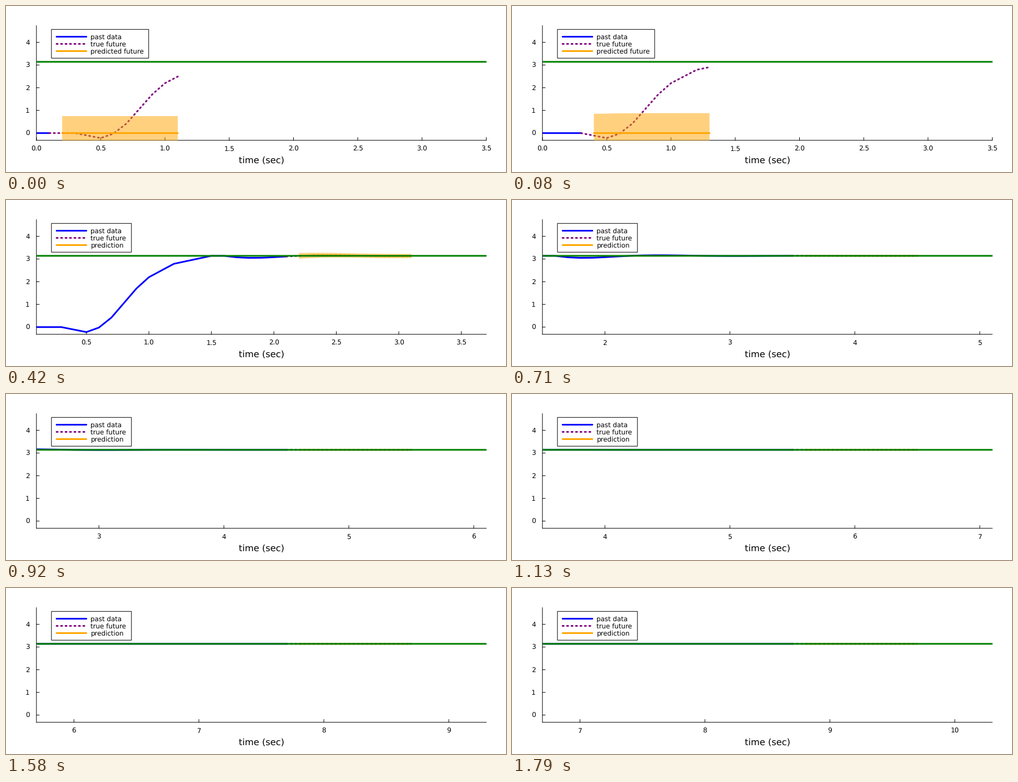
These frames come from a looping animation (900 by 300 pixels, 1.83 s). A matplotlib script:

```python
import numpy as np
import matplotlib.pyplot as plt
from matplotlib.animation import FuncAnimation
from matplotlib.patches import Rectangle

W, H, DPI = 900, 300, 100
PT = 72 / DPI                      # points per pixel
FRAMES, LOOP = 44, 1830
LEFT, RIGHT, TOP, BOTTOM = 54.8, 864.5, 35.5, 242.7
Y0, UNIT = 229.7, 41.0             # pixel row of zero, pixels per unit
SMALL, LARGE = 11.9 * PT, 16.25 * PT

plt.rcParams.update({"font.family": "DejaVu Sans", "text.hinting": "none"})


def response(t):
    """Dip, rise to pi, then a damped ripple around it."""
    rise = np.interp(t, [.3, .5, .6, .7, .9, 1, 1.2, 1.5],
                     [0, -.22, -.02, .42, 1.7, 2.2, 2.79, np.pi])
    s = np.maximum(t - 1.6, 0)
    return rise - .155 * np.exp(-2 * s) * np.sin(np.pi * s / .6)


T = np.arange(1 + 2 * FRAMES + 11) / 10
TRUTH = response(T)
AHEAD = np.arange(10)


def predict(k, n):
    """Mean and half width: doubt grows until step 5, then dies away."""
    up, down = min(k, 5), max(k - 5, 0)
    near = (.75 + .1 * up) * np.exp(-.46 * down)
    far = (.75 + .13 * up ** 2) * np.exp(-.75 * down)
    half = far - (far - near) * np.exp(-(AHEAD / 1.9) ** 1.4)
    gain = np.clip((k - 1) / 4, 0, 1)
    bump = .15 * np.exp(-((k - 5) / 1.5) ** 2 - ((AHEAD - 1.2) / 1.7) ** 2)
    return TRUTH[n] + gain * (TRUTH[n + 1:n + 11] - TRUTH[n]) + bump, half


def ypx(v):
    return Y0 - UNIT * np.asarray(v)


fig = plt.figure(figsize=(W / DPI, H / DPI), dpi=DPI, facecolor="white")
ax = fig.add_axes([0, 0, 1, 1])
ax.set(xlim=(0, W), ylim=(H, 0))
ax.axis("off")
window = Rectangle((LEFT, TOP), RIGHT - LEFT, BOTTOM - TOP,
                   transform=ax.transData)


def rule(xs, ys):
    return ax.plot(xs, ys, color="black", lw=PT, zorder=1, snap=False)[0]


def curve(color, z, xs=(), ys=(), dashed=False, clip=True):
    line, = ax.plot(xs, ys, color=color, lw=3 * PT, zorder=z, snap=False,
                    solid_capstyle="round", dash_capstyle="round",
                    solid_joinstyle="round", dash_joinstyle="round",
                    ls=(0, (.7, 1.97)) if dashed else "-")
    if clip:
        line.set_clip_path(window)
    return line


def label(x, y, s="", size=SMALL, ha="left"):
    return ax.text(x, y, s, fontsize=size, ha=ha, va="baseline", zorder=9)


# Axes
rule([LEFT, LEFT], [TOP, BOTTOM])
rule([LEFT, RIGHT], [BOTTOM, BOTTOM])
for v in range(5):
    rule([LEFT, LEFT + 5], [ypx(v)] * 2)
    label(42.5, ypx(v) + 4.3, str(v), ha="right")
label(460, 283.6, "time (sec)", LARGE, "center")
ticks = [(rule([], []), label(0, 261.5, ha="center")) for _ in range(8)]

# Series
past = curve("blue", 2)
future = curve("purple", 3, dashed=True)
band, = ax.fill([0, 0, 0], [0, 0, 0], color="orange", alpha=.5, lw=0,
                zorder=4, snap=False)
band.set_clip_path(window)
pred = curve("orange", 5)
curve("green", 6, [LEFT, RIGHT], [ypx(np.pi)] * 2)

# Legend
frame = Rectangle((81.8, 42.3), 175, 52, fc="white", ec="black", lw=PT,
                  zorder=7, snap=False)
ax.add_patch(frame)
names = []
for i, (color, name) in enumerate([("blue", "past data"),
                                   ("purple", "true future"), ("orange", "")]):
    y = 55.5 + 13 * i
    curve(color, 8, [91, 144.7], [y, y], dashed=color == "purple", clip=False)
    names.append(label(152.5, y + 4.3, name))


def update(k):
    n = 1 + 2 * k
    now = T[n]
    scrolling = now > 2
    lo, hi = (now - 2, now + 1.6) if scrolling else (0, 3.5)

    def xpx(t):
        return LEFT + (t - lo) * (RIGHT - LEFT) / (hi - lo)

    past.set_data(xpx(T[:n + 1]), ypx(TRUTH[:n + 1]))
    future.set_data(xpx(T[n:n + 11]), ypx(TRUTH[n:n + 11]))
    mean, half = predict(k, n)
    x = xpx(T[n + 1:n + 11])
    pred.set_data(x, ypx(mean))
    band.set_xy(np.column_stack([np.r_[x, x[::-1]],
                                 ypx(np.r_[mean + half, (mean - half)[::-1]])]))

    # Whole-second ticks if four of them fit, else half seconds
    per_sec, fmt = 1, "{:.0f}"
    if not scrolling or np.floor(hi + 1e-9) - np.ceil(lo - 1e-9) < 3:
        per_sec, fmt = 2, "{:.1f}"
    first = int(np.ceil(per_sec * lo - 1e-9))
    for i, (tick, text) in enumerate(ticks):
        mark = (first + i) / per_sec
        shown = mark <= hi + 1e-9
        tick.set_visible(shown)
        text.set_visible(shown)
        p = xpx(mark)
        tick.set_data([p, p], [BOTTOM - 5, BOTTOM])
        text.set_x(p)
        text.set_text(fmt.format(mark))

    frame.set_width(144 if scrolling else 175)
    names[2].set_text("prediction" if scrolling else "predicted future")
    return []


anim = FuncAnimation(fig, update, frames=FRAMES, interval=LOOP / FRAMES,
                     init_func=lambda: update(0), repeat=True, repeat_delay=0,
                     blit=False)
plt.show()
```
